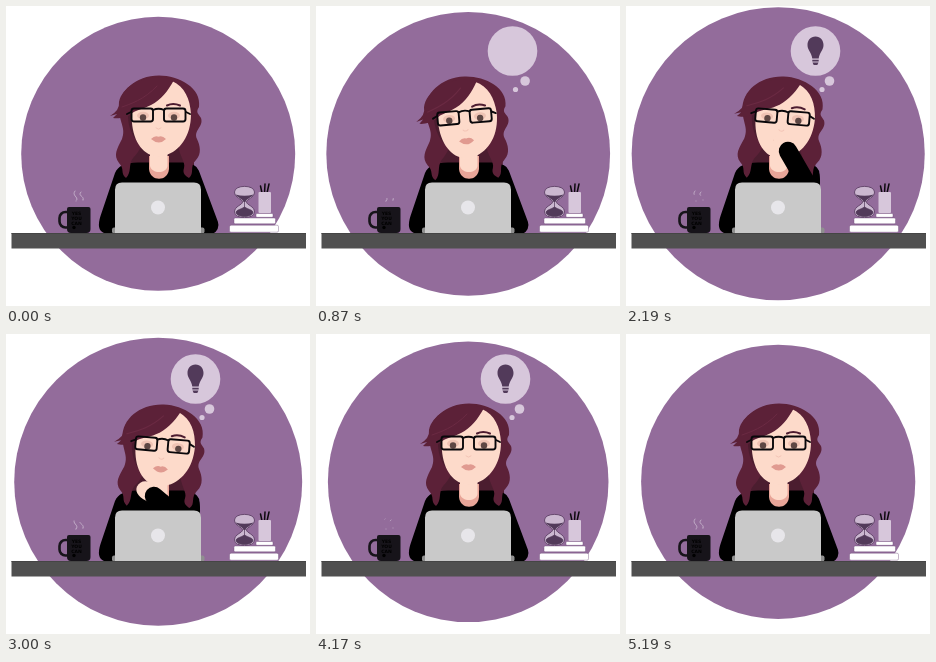
These frames come from a looping animation (304x300 px, 5220 ms). An HTML page:

```html
<!DOCTYPE html>
<html lang="en">
<head>
<meta charset="utf-8">
<title>Thinking at the desk</title>
<style>
  html, body { margin: 0; width: 100%; height: 100%; overflow: hidden; background: #fff; }
  svg { display: block; width: 100vw; height: 100vh; }
  .line { fill: none; stroke-linecap: round; stroke-linejoin: round; }
  .skin { fill: #fddaca; }
  .hair { fill: #5c2138; }
  .shade { fill: #4b1d2f; }
  .dark { fill: #523a5a; }
  .pale { fill: #d7c7db; }
</style>
</head>
<body>
<svg viewBox="0 0 304 300">
  <circle id="disc" cx="152.200" cy="147.800" r="137" fill="#936c9b"/>

  <g class="pale">
    <circle id="dotSmall" r="2.6"/>
    <circle id="dotMid" r="4.8"/>
    <circle id="cloud" r="24.8"/>
  </g>
  <g id="bulb" class="dark">
    <path d="M0 -15C-5 -15 -8 -11 -8 -6.500C-8 -1 -3.800 1 -3.200 7H3.200C3.800 1 8 -1 8 -6.500C8 -11 5 -15 0 -15Z"/>
    <path d="M-3.200 8.300H3.200V10H-3.200ZM-3 11H3L1.800 13.500H-1.800Z"/>
  </g>

  <path id="backHair" class="shade" d="M122 95H188V162H122Z"/>
  <path d="M132 156.500C119 156.500 112 160 109 167L94.500 210Q90 224 98 227H192L194 178C195 164 190 156.500 174 156.500Z"/>
  <path id="upperArm" class="line" stroke="#000" stroke-width="19"/>
  <path d="M143 150H163V163C162 176 144 176 143 163Z" fill="#e8a598"/>
  <path d="M144 140H161.500V160C160 168 146 168 144 160Z" class="skin"/>

  <path id="locks" class="hair" d="M153 69.500C130 69.500 112 85 113 104C114 118 120 122 116 133C111 143 107 149 113 157C119 163 114 167 120 172C126 166 122 159 127 152Q133 146 136 138H172C173 150 180 156 178 162C176 168 180 170 183 172C189 167 183 161 190 154C196 148 194 139 191 133C187 124 198 121 195 112C193 108 189 107 193 101C196 82 173 69.500 153 69.500Z"/>
  <g id="head">
    <path class="shade" d="M122 106L134 100L140 142C130 138 121 124 122 106Z"/>
    <path class="skin" d="M126 103C131 86 151 78 166 75C179 81 184 93 185 108C185 130 174 145 159 149.500Q152 152 145 149C132 144 124 127 126 103Z"/>
    <g fill="#efc3b4">
      <ellipse cx="137" cy="109.500" rx="6" ry="3.700"/>
      <ellipse cx="168" cy="109.500" rx="6" ry="3.700"/>
    </g>
    <g id="pupils" fill="#5e4744">
      <circle cx="137" cy="111.500" r="3.200"/>
      <circle cx="168" cy="111.500" r="3.200"/>
    </g>
    <path class="line" d="M150 122Q152.500 124.500 155 122" stroke="#f3c5b6" stroke-width="1"/>
    <path d="M145 133Q149 129 152.500 130.800Q156 129 160 133Q153 140 145 133Z" fill="#e09a90"/>
    <path class="line" d="M161 99.500Q167 96.500 174 99.500" stroke="#4d1c30" stroke-width="2"/>
    <path class="hair" d="M168 74C162 85 155 94 145 99C138 103 129 104 125 108C121 112 111 113 107 112L111 108L104 110Q114 104 113 96C117 77 146 66 168 74Z"/>
    <path class="line" d="M116 101C124 98 138 94 151 80" stroke="#6b2a43" stroke-width="1"/>
    <g class="line" stroke="#09070a" stroke-width="1.900">
      <rect x="125.500" y="102.500" width="21.500" height="13" rx="2.500"/>
      <rect x="158" y="102.500" width="21.500" height="13" rx="2.500"/>
      <path d="M147 104Q152.500 101.500 158 104M125 106L121 108M180 106L184 108"/>
    </g>
  </g>

  <g id="forearm">
    <path class="skin" d="M-8 0C-11 -9 -10 -17 -4 -19C3 -21 8 -16 9 -8L8 0Z"/>
    <path class="line" d="M0 0V42" stroke="#000" stroke-width="18.500"/>
  </g>

  <g id="steam" class="line" stroke="#c6b1cb" stroke-width=".9">
    <path pathLength="1" d="M70 195C74 191 65 190 69 185"/>
    <path pathLength="1" d="M77 194C79 190 71 190 75 186"/>
  </g>
  <rect x="53.500" y="206" width="13" height="15.500" rx="6" fill="none" stroke="#17141a" stroke-width="2.600"/>
  <path d="M61 203Q61 201 63 201H82.500Q84.500 201 84.500 203V223Q84.500 227 80.500 227H65Q61 227 61 223Z" fill="#17141a"/>
  <g font-family="'DejaVu Sans', sans-serif" font-weight="700" font-size="4.500" text-anchor="middle">
    <text x="70.500" y="208.500">YES</text>
    <text x="70.500" y="213.500">YOU</text>
    <text x="70.500" y="218.500">CAN</text>
  </g>
  <circle cx="68" cy="221.500" r="1.700"/>

  <g id="hourglass">
    <path d="M228.500 186C228.500 178.500 248.500 178.500 248.500 186C248.500 192 240.500 193 240.500 196C240.500 199 248.500 200 248.500 206C248.500 213.500 228.500 213.500 228.500 206C228.500 200 236.500 199 236.500 196C236.500 193 228.500 192 228.500 186Z" fill="#cbb8d0" stroke="#5f4267" stroke-width=".9"/>
    <path class="dark" d="M229.500 188.500Q238.500 191 247.500 188.500C245 192 240 193 239.500 196H237.500C237 193 232 192 229.500 188.500Z"/>
    <path class="dark" d="M238.500 196V202M230 206C231 203.500 235 203.500 238.500 201C242 203.500 246 203.500 247 206C247 212 230 212 230 206Z" stroke="#523a5a" stroke-width=".7"/>
  </g>
  <path class="line" d="M256 187L254.500 180M258.500 187L259 178M261 187L263 178" stroke="#0d0a0e" stroke-width="1.500"/>
  <rect x="252.500" y="186" width="12.500" height="21" rx="1" class="pale"/>
  <g fill="#fff" stroke="#6d4b76" stroke-width=".4">
    <rect x="250" y="207.500" width="17" height="3.800" rx="1"/>
    <rect x="228" y="212" width="41.500" height="5.800" rx="1.200"/>
    <rect x="223.500" y="219.200" width="49" height="7" rx="1.500"/>
  </g>

  <rect x="106" y="221.500" width="92.500" height="6" rx="2" fill="#8f8f8f"/>
  <path d="M109 227V183.500Q109 176.500 116 176.500H188Q195 176.500 195 183.500V227Z" fill="#c9c9c9"/>
  <circle cx="152" cy="201.500" r="7" fill="#e7e6ea"/>
  <rect x="5.500" y="227" width="294.500" height="15.500" fill="#505050"/>
  <rect x="5.500" y="227" width="294.500" height="1" fill="#454545"/>
</svg>
<script>
  const LOOP = 5220;
  const PEAK = 2175;
  const STEAM = LOOP / 3;
  const part = id => document.getElementById(id);
  const set = (id, name, value) => part(id).setAttribute(name, value);
  const clamp = x => Math.max(0, Math.min(1, x));
  const smooth = x => x * x * (3 - 2 * x);
  const ramp = (t, from, to) => smooth(clamp((t - from) / (to - from)));

  // Eased value between [time, value] stops.
  const track = (t, stops) => stops.slice(1).reduce(
    (value, [time, next], i) => value + (next - stops[i][1]) * ramp(t, stops[i][0], time),
    stops[0][1]);

  function drawDisc(t) {
    const rise = t / PEAK;
    const size = t < PEAK ? rise * (1.45 - 0.45 * rise) : (LOOP - t) / (LOOP - PEAK);
    set('disc', 'r', 137 + 9.6 * size);
  }

  function drawHead(t) {
    const tilt = track(t, [[300, 0], [720, -5], [1020, -5], [1480, 5], [3420, 5], [3960, 0]]);
    const drop = Math.abs(tilt) * 0.35;
    const sway = `translate(0 ${drop / 2}) rotate(${tilt * 0.45} 152 190)`;
    set('head', 'transform', `translate(0 ${drop}) rotate(${tilt} 152 155)`);
    set('locks', 'transform', sway);
    set('backHair', 'transform', sway);
    set('pupils', 'transform', `translate(${Math.max(0, tilt) * 0.12} 0)`);
  }

  function drawThought(t) {
    const shift = track(t, [[870, 7], [1900, 0]]);
    const place = (id, x, y, start, end) => {
      const size = ramp(t, start, start + 160) * (1 - ramp(t, end, end + 160));
      set(id, 'transform', `translate(${x} ${y}) scale(${size})`);
    };
    place('dotSmall', 196 + shift * 0.5, 83.5, 360, 4860);
    place('dotMid', 203.5 + shift * 0.8, 75, 460, 4760);
    place('cloud', 189.5 + shift, 45, 580, 4640);
    place('bulb', 189.5, 45.5, 1830, 4560);
  }

  function drawArm(t) {
    const lift = ramp(t, 1700, 2060) * (1 - ramp(t, 3300, 3700));
    set('upperArm', 'd', `M184 168L${203 - 20 * lift} ${219 - 5 * lift}`);

    const x = track(t, [[1760, 176], [2150, 162], [2280, 162], [2600, 148], [3200, 148], [3600, 172]]);
    const y = track(t, [[1760, 205], [2150, 145], [2280, 145], [2600, 162], [3200, 162], [3600, 215]]);
    const turn = track(t, [[1760, -10], [2150, -30], [2280, -30], [2600, -50], [3200, -50], [3600, -20]]);
    set('forearm', 'transform', `translate(${x} ${y}) rotate(${turn})`);
    set('forearm', 'visibility', t > 1760 && t < 3600 ? 'visible' : 'hidden');
  }

  function drawSteam(t) {
    [...part('steam').children].forEach((wisp, i) => {
      const phase = (t / STEAM + 0.6 - i * 0.04) % 1;
      const head = clamp(phase / 0.4);
      const tail = clamp((phase - 0.55) / 0.45);
      wisp.setAttribute('stroke-dasharray', `0 ${tail} ${Math.max(0, head - tail)} 2`);
      wisp.setAttribute('opacity', head > tail ? 1 : 0);
    });
  }

  function draw(now) {
    const t = now % LOOP;
    [drawDisc, drawHead, drawThought, drawArm, drawSteam].forEach(step => step(t));
  }

  const start = performance.now();
  function frame() {
    draw(performance.now() - start);
    requestAnimationFrame(frame);
  }
  frame();
</script>
</body>
</html>
```
